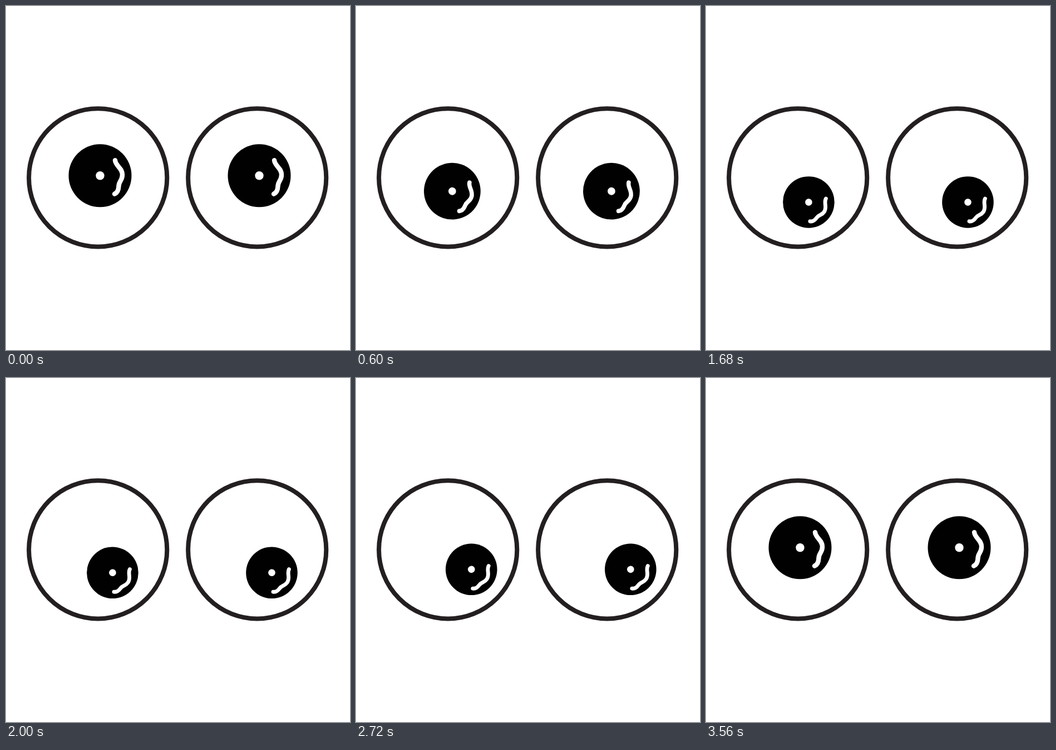
Recreate the animation shown at these times as an HTML page. Size 618 by 618 pixels, loop 3.6 s.

```html
<!DOCTYPE html>
<html lang="en">
<head>
<meta charset="utf-8">
<title>Googly eyes</title>
<style>
  html, body { margin: 0; height: 100%; overflow: hidden; background: #fff; }
  svg { display: block; width: 100%; height: 100%; }
</style>
</head>
<body>
<svg viewBox="0 0 618 618">
  <defs>
    <g id="eye">
      <circle cx="165.2" cy="308.4" r="124.1" fill="#fff" stroke="#231f20" stroke-width="8"/>
      <g id="pupil">
        <circle r="56.5" fill="#010101"/>
        <circle r="7.7" fill="#fff"/>
        <path d="M27-27.5C28-17 40-14 40-1.5C40 9 33.5 10 33.5 19Q33 30 26 33"
          fill="none" stroke="#fff" stroke-width="8.4" stroke-linecap="round"/>
      </g>
    </g>
  </defs>
  <use href="#eye"/>
  <use href="#eye" x="286"/>
</svg>
<script>
  const LOOP = 3600, STEP = 40;
  const pupil = document.getElementById('pupil');

  // Linear progress from 0 to 1 between two times
  const ramp = (t, from, to) => Math.min(1, Math.max(0, (t - from) / (to - from)));

  function draw(now) {
    const t = Math.floor(now % LOOP / STEP) * STEP;
    const away = 1 - ramp(t, 2880, 3560);
    const down = ramp(t, 0, 1090) * away;
    const slide = ramp(t, 1300, 2880) * away;
    const x = 169 + 7.1 * down + 34.7 * slide;
    const y = 304.7 + 50.9 * down - 13.1 * slide;
    pupil.setAttribute('transform',
      `translate(${x} ${y}) rotate(${34 * down}) scale(${1 - 0.181 * down})`);
  }

  function tick() {
    draw(performance.now());
    requestAnimationFrame(tick);
  }
  tick();
</script>
</body>
</html>
```
